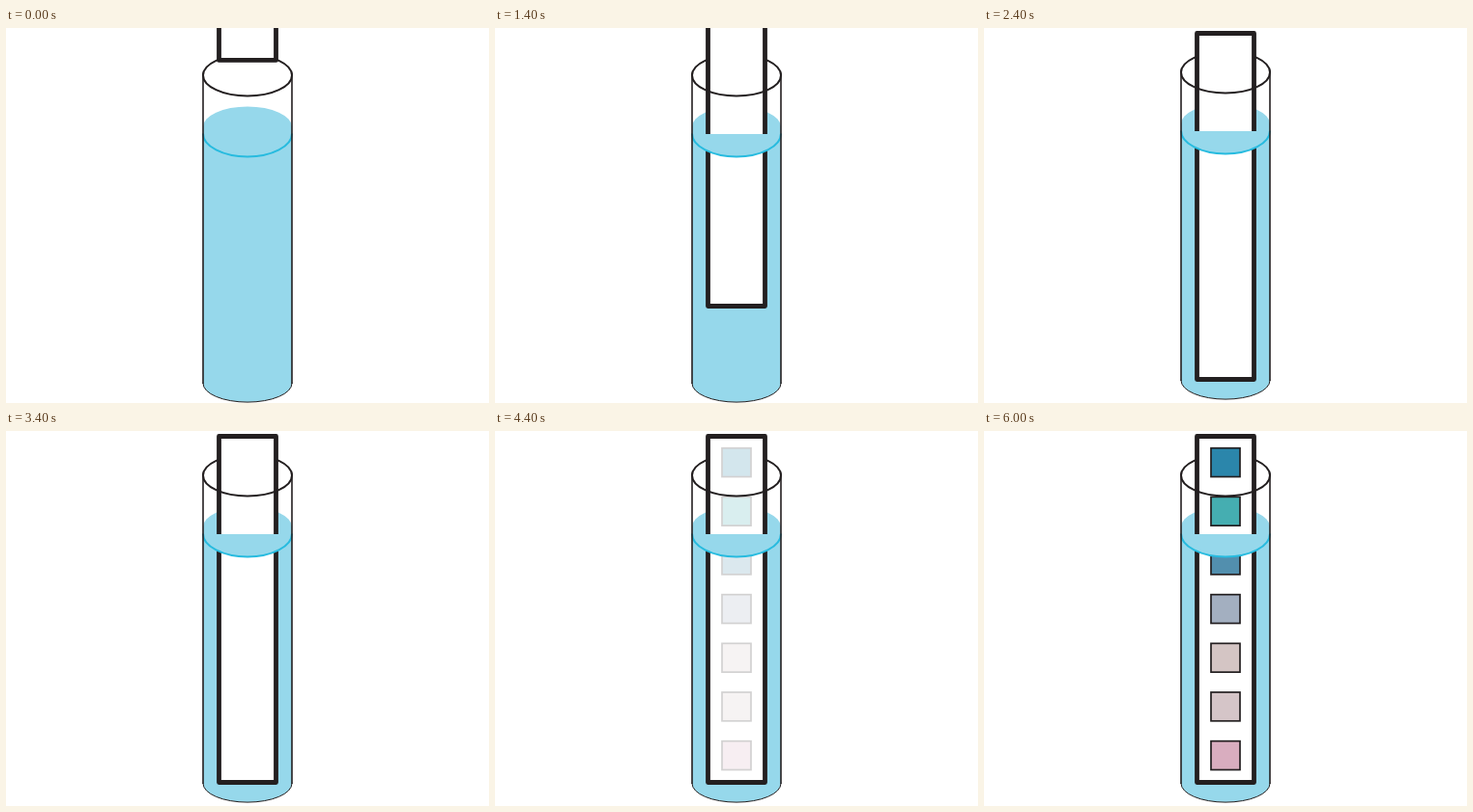
These frames come from a looping animation (500x389 px, 7.5 s). An HTML page:

```html
<!DOCTYPE html>
<html lang="en">
<head>
<meta charset="utf-8">
<title>Test strip</title>
<style>
  html, body { margin: 0; width: 100%; height: 100%; overflow: hidden; background: #fff; }
  svg { display: block; width: 500px; height: 389px; }
</style>
</head>
<body>
<svg viewBox="0 0 500 389" fill="none" stroke="#231f20">
  <g id="tube">
    <path fill="#96d8eb" stroke="none" d="M204 102.5A46 21 0 0 1 296 102.5V368.5A46 19.6 0 0 1 204 368.5Z"/>
    <path stroke-width="2" d="M204 49A46 21.5 0 0 1 296 49"/>
    <g id="strip">
      <rect x="220.5" y="-359" width="59" height="359" fill="#fff" stroke-width="4.8" stroke-linejoin="round"/>
      <g id="pads" stroke-width="1.7"></g>
    </g>
    <path fill="#96d8eb" stroke="none" d="M204 110H296A46 23.5 0 0 1 204 110Z"/>
    <path stroke="#27bbdf" stroke-width="2" d="M204 109.5A46 24 0 0 0 296 109.5"/>
    <path stroke-width="2" d="M204 49A46 21.5 0 0 0 296 49"/>
    <path stroke-width="1.6" d="M204 46.5V369M296 46.5V369"/>
    <path stroke-width="1" d="M204 368.5A46 19.6 0 0 0 296 368.5"/>
  </g>
</svg>
<script>
const LOOP = 7500, STEP = 100;
const [tube, strip, pads] = ['tube', 'strip', 'pads'].map(id => document.getElementById(id));

const colors = ['#2b86ab', '#45aeb1', '#528fae', '#a3afc0', '#d4c5c4', '#d5c5c8', '#d9adbf'];
pads.innerHTML = colors.map((color, i) =>
  `<rect x="235" y="${-346.8 + i * 50.66}" width="30" height="29.8" fill="${color}"/>`).join('');

const ramp = (t, from, to) => Math.min(1, Math.max(0, (t - from) / (to - from)));

// The strip sinks at a nearly even pace until it meets the bottom.
const dip = t => 33.4 + 129.6 * ramp(t, 0, 700) + 125.5 * ramp(t, 700, 1400) + 79 * ramp(t, 1400, 1800);

// The tube rests 3px higher, dropping for three short beats and once after the colours develop.
function lift(t) {
  const beat = t < 4200 && (t - 2000) % 900 < 400;
  const settle = t >= 5500 && t < 6000;
  return beat || settle ? 0 : -3;
}

// A faint hint first, then a steady fade to full colour.
function fade(t) {
  const hint = Math.floor(ramp(t, 4000, 4400) * 2) / 10;
  return Math.max(hint, ramp(t, 4400, 5400));
}

function draw(now) {
  const t = Math.floor(now % LOOP / STEP) * STEP;
  tube.setAttribute('transform', `translate(0 ${lift(t)})`);
  strip.setAttribute('transform', `translate(0 ${dip(t)})`);
  pads.setAttribute('opacity', fade(t));
}

const start = performance.now();
function tick() {
  draw(performance.now() - start);
  requestAnimationFrame(tick);
}
tick();
</script>
</body>
</html>
```
